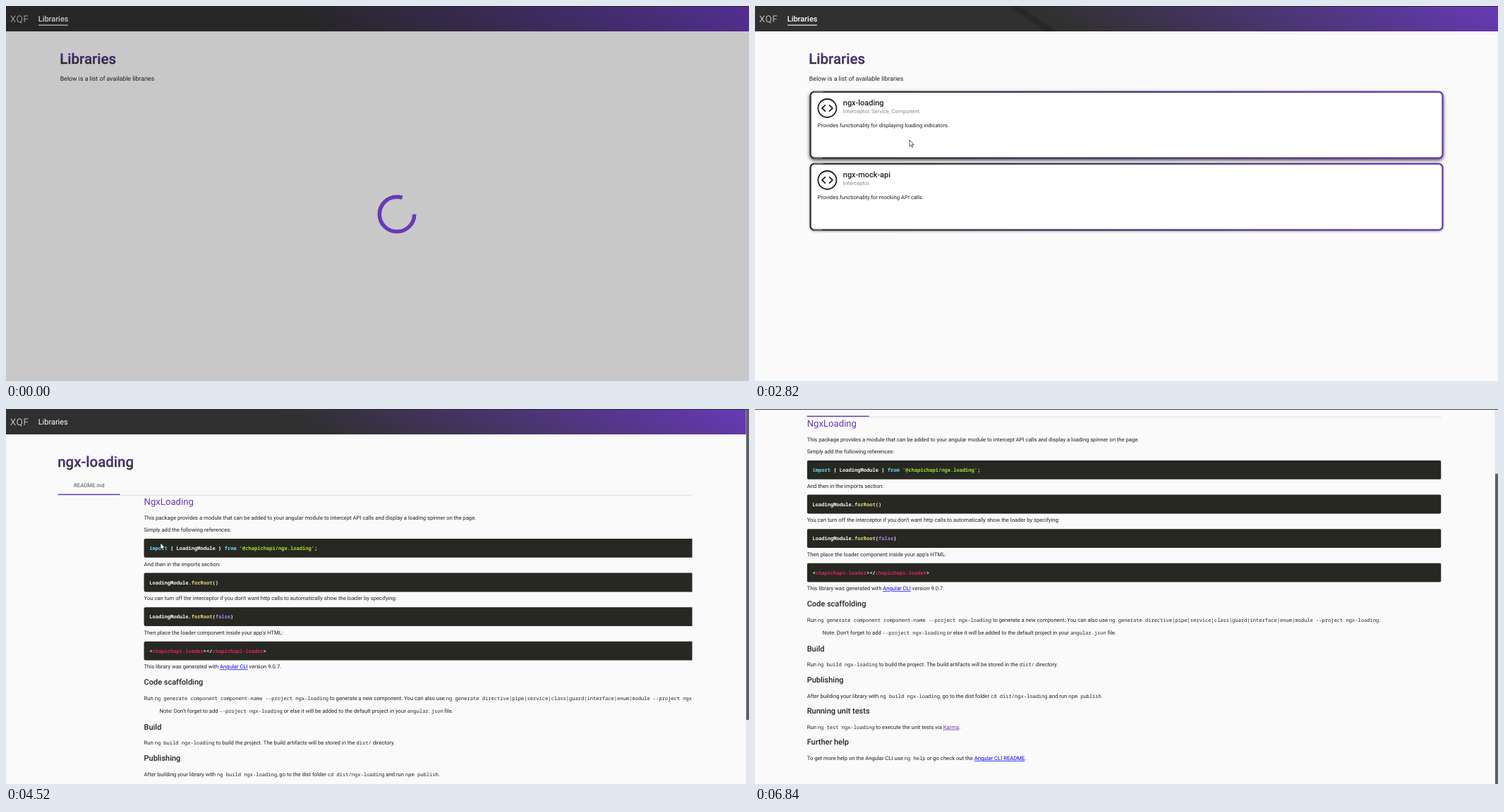
Recreate the animation shown at these times as an HTML page. Size 1053 by 532 pixels, loop 7150 ms.

```html
<!DOCTYPE html>
<html lang="en">
<head>
<meta charset="utf-8">
<title>Libraries</title>
<style>
  html, body { margin: 0; width: 100%; height: 100%; overflow: hidden; background: #fafafa; }
  svg { display: block; width: 100vw; height: 100vh; }
  text { font: 7.68px Roboto, sans-serif; fill: #212121; white-space: pre; text-rendering: geometricPrecision; }
  .brand { font-size: 13.16px; font-weight: 300; letter-spacing: .9px; fill: #fff; }
  .nav { font-size: 10.97px; fill: #fff; }
  .title { font-size: 20.5px; font-weight: 500; fill: url(#ink); stroke: url(#ink); stroke-width: .25; }
  .lead { font-size: 8.775px; }
  .head { font-size: 10.97px; font-weight: 500; }
  .top { font-size: 13.16px; fill: #673ab7; }
  .muted { fill: #8a8a8a; }
  .tab { font-weight: 500; fill: #707070; text-anchor: middle; }
  .mono { font-family: "Noto Sans Mono", monospace; font-size: 7.08px; }
  .block { fill: #f8f8f2; font-weight: 600; }
  .link { fill: #0000ee; text-decoration: underline; }
  .seen { fill: #673ab7; }
  .frame { fill: #fff; stroke: url(#edge); stroke-width: 2.2; filter: drop-shadow(0 1.8px 1.5px rgba(0, 0, 0, .4)); }
  .hover .frame { filter: drop-shadow(0 2.6px 2.4px rgba(0, 0, 0, .75)); }
  .icon { fill: none; stroke: #212121; stroke-width: 1.8; }
</style>
</head>
<body>
<svg id="stage" viewBox="0 0 1053 532" preserveAspectRatio="none">
  <defs>
    <linearGradient id="bar" gradientUnits="userSpaceOnUse" x1="385" x2="1053" y1="0" y2="0" gradientTransform="skewX(61)">
      <stop offset="0" stop-color="#303030"/><stop offset="1" stop-color="#673ab7"/>
    </linearGradient>
    <linearGradient id="edge" gradientUnits="userSpaceOnUse" x1="78" x2="975" y1="0" y2="0">
      <stop offset="0" stop-color="#303030"/><stop offset=".1" stop-color="#303030"/><stop offset="1" stop-color="#673ab7"/>
    </linearGradient>
    <linearGradient id="ink" x1="0" x2="0" y1="0" y2="1">
      <stop offset=".15" stop-color="#5a34a0"/><stop offset=".85" stop-color="#303030"/>
    </linearGradient>
    <clipPath id="tabClip"><rect x="73.7" y="0" width="898.8" height="700"/></clipPath>
    <filter id="soft"><feGaussianBlur stdDeviation="1.6"/></filter>
    <clipPath id="barClip"><rect width="1053" height="36"/></clipPath>
  </defs>
  <g id="page">
    <rect width="1053" height="36" fill="url(#bar)"/>
    <g id="stripe" clip-path="url(#barClip)">
      <path d="M358 -2L371 -2L430 38L414 38Z" opacity=".18" filter="url(#soft)"/>
    </g>
    <text class="brand" x="6" y="23">XQF</text>
    <text class="nav" id="nav" x="45.7" y="22">Libraries</text>
    <rect id="underline" x="46" y="26.6" width="42" height="1.1" fill="#fff"/>
    <g id="list">
      <text class="title" x="76.2" y="82">Libraries</text>
      <text class="lead" x="76.8" y="105.8">Below is a list of available libraries</text>
      <g id="cards"></g>
    </g>
    <g id="detail">
      <text class="title" id="name" y="82">ngx-loading</text>
      <rect id="rule" width="899" height=".8" fill="#000" opacity=".14"/>
      <g id="tabs">
        <text class="tab" x="117.8" y="110.8">README.md</text>
        <rect x="73.7" y="120.6" width="88" height="1.4" fill="#673ab7"/>
        <g clip-path="url(#tabClip)"><g id="readme"></g></g>
      </g>
    </g>
  </g>
  <g id="scrollbar">
    <rect x="1048.6" width="4.4" height="532" fill="#e6e4ef"/>
    <rect id="thumb" x="1049" width="4" height="441" fill="#606060"/>
  </g>
  <g id="loader">
    <rect width="1053" height="532" opacity=".2"/>
    <circle id="arc" cx="554" cy="295.4" r="24.7" fill="none" stroke="#673ab7" stroke-width="5.5" pathLength="360"/>
  </g>
  <path id="cursor" d="M0 0V9.2L2.1 7.3L3.5 10.4L4.9 9.8L3.5 6.7H6.3Z" fill="#fff" stroke="#111" stroke-width=".7"/>
  <rect width="1053" height=".9" fill="#2b2b2b"/>
</svg>
<script>
const LOOP = 7150;
const $ = id => document.getElementById(id);
const show = (id, on) => { $(id).style.display = on ? '' : 'none'; };
const escape = s => s.replace(/</g, '&lt;').replace(/>/g, '&gt;');
const span = (cls, s) => `<tspan class="${cls}">${s}</tspan>`;
const line = (cls, x, y, s) => `<text class="${cls}" x="${x}" y="${y}">${s}</text>`;

// Backticks mark code, [ ] a link, { } a visited link.
const rich = s => s
  .replace(/`(.+?)`/g, (_, code) => span('mono', code))
  .replace(/\[(.+?)\]/g, (_, label) => span('link', label))
  .replace(/\{(.+?)\}/g, (_, label) => span('link seen', label));
const tint = (color, s) => `<tspan fill="${color}">${escape(s)}</tspan>`;

const card = (id, y, name, kinds, about) => `<g id="${id}" transform="translate(0 ${y})">
  <rect class="frame" x="78.6" y="1.4" width="895.8" height="93.9" rx="5.5"/>
  <path d="M84 1.3H97M84 95.3H95" stroke="#fff" stroke-width="1.2" stroke-dasharray="1.5 1" opacity=".55"/>
  <g class="icon"><circle cx="102.4" cy="24.6" r="13"/>
    <path d="M99.8 20L95 24.6L99.8 29.2M105 20L109.8 24.6L105 29.2"/></g>
  ${line('head', 124.8, 20.2, name)}${line('muted', 124.8, 31.8, kinds)}${line('', 88.6, 51.8, about)}</g>`;

$('cards').innerHTML =
  card('card1', 120.4, 'ngx-loading', 'Interceptor, Service, Component', 'Provides functionality for displaying loading indicators.') +
  card('card2', 222.4, 'ngx-mock-api', 'Interceptor', 'Provides functionality for mocking API calls.');

const LEFT = 73.7;
const [CYAN, GREEN, YELLOW, VIOLET, PINK] = ['#66d9ef', '#a6e22e', '#e6db74', '#ae81ff', '#d82463'];
const blocks = [
  tint(CYAN, 'import') + ' { LoadingModule } ' + tint(CYAN, 'from') + ' ' + tint(GREEN, "'@chapichapi/ngx.loading'") + ';',
  'LoadingModule.' + tint(YELLOW, 'forRoot') + '()',
  'LoadingModule.' + tint(YELLOW, 'forRoot') + '(' + tint(VIOLET, 'false') + ')',
  '&lt;' + tint(PINK, 'chapichapi-loader') + '&gt;&lt;/' + tint(PINK, 'chapichapi-loader') + '&gt;'
];
const heads = ['Code scaffolding', 'Build', 'Publishing', 'Running unit tests', 'Further help'];
const headY = [391, 455, 499, 543, 587.2];
const paragraphs = [
  [156.6, 'This package provides a module that can be added to your angular module to intercept API calls and display a loading spinner on the page.'],
  [174.1, 'Simply add the following references:'],
  [222.7, 'And then in the imports section:'],
  [271.2, "You can turn off the interceptor if you don't want http calls to automatically show the loader by specifying:"],
  [319.8, "Then place the loader component inside your app's HTML:"],
  [368.4, 'This library was generated with [Angular CLI] version 9.0.7.'],
  [412.7, 'Run `ng generate component component-name --project ngx-loading` to generate a new component. You can also use `ng generate directive|pipe|service|class|guard|interface|enum|module --project ngx-loading`.'],
  [431.2, "Note: Don't forget to add `--project ngx-loading` or else it will be added to the default project in your `angular.json` file.", 22],
  [476.3, 'Run `ng build ngx-loading` to build the project. The build artifacts will be stored in the `dist/` directory.'],
  [520.6, 'After building your library with `ng build ngx-loading`, go to the dist folder `cd dist/ngx-loading` and run `npm publish`.'],
  [564.7, 'Run `ng test ngx-loading` to execute the unit tests via {Karma}.'],
  [608.9, 'To get more help on the Angular CLI use `ng help` or go check out the [Angular CLI README].']
];
$('readme').innerHTML = line('top', LEFT, 135.8, 'NgxLoading') +
  paragraphs.map(([y, s, indent = 0]) => line('', LEFT + indent, y, rich(s))).join('') +
  heads.map((s, i) => line('head', LEFT, headY[i], s)).join('') +
  blocks.map((s, i) => {
    const y = 184 + 48.6 * i;
    return `<rect x="${LEFT}" y="${y}" width="898.8" height="26.8" rx="2.3" fill="#272822"/>` +
      line('mono block', LEFT + 7.8, y + 16.1, s);
  }).join('');

// Start, end and number of steps of each stretch of movement; the picture rests in between.
const moves = [[70, 500, 7], [950, 1640, 10], [1800, 2270, 7], [2740, 3410, 10], [3500, 3810, 5],
  [4360, 4760, 6], [4920, 5150, 4], [5550, 5830, 5], [6150, 6840, 10]];
const path = [[950, 775, 503], [1300, 620, 410], [1640, 300, 275], [1740, 300, 275], [2270, 219, 190],
  [4850, 219, 190], [5150, 574, 249], [6080, 574, 249], [6770, 1040, 521]];
const scroll = [[5500, 0], [5550, 14], [5620, 55], [5690, 91], [5760, 107.5], [5830, 111]];

function settle(t) {
  let shown = 0;
  for (const [from, to, steps] of moves) {
    if (t < from) break;
    const step = Math.min(steps - 1, Math.floor((t - from) / (to - from) * (steps - 1) + .1));
    shown = from + (to - from) * step / (steps - 1);
  }
  return shown;
}

function track(points, t) {
  if (t <= points[0][0]) return points[0].slice(1);
  const i = points.findIndex(p => p[0] > t);
  if (i < 0) return points[points.length - 1].slice(1);
  const [a, b] = [points[i - 1], points[i]];
  const k = (t - a[0]) / (b[0] - a[0]);
  return a.slice(1).map((v, n) => v + (b[n + 1] - v) * k);
}

// cubic-bezier(.35, 0, .25, 1)
function ease(x) {
  let lo = 0, hi = 1, u = .5;
  for (let i = 0; i < 20; i++) {
    u = (lo + hi) / 2;
    const at = 1.05 * (1 - u) ** 2 * u + .75 * (1 - u) * u * u + u ** 3;
    if (at < x) lo = u; else hi = u;
  }
  return u * u * (3 - 2 * u);
}

function spin(age) {
  const turn = age * .18;
  const growing = age <= 500;
  const k = ease(Math.min(1, growing ? age / 500 : (age - 500) / 500));
  const length = 360 * (growing ? .05 + .75 * k : .8 - .75 * k);
  const start = growing ? turn - 90 : turn - 162.5 - length;
  $('arc').setAttribute('stroke-dasharray', `${length} 360`);
  $('arc').setAttribute('transform', `rotate(${start} 554 295.4)`);
}

function draw(time) {
  const t = settle(time);
  const inDetail = t > 2850, opened = t >= 4360;
  const loading = t < 500 || (inDetail && t < 3810);

  show('list', !inDetail);
  show('cards', !loading);
  show('detail', inDetail);
  show('underline', !inDetail);
  show('stripe', !inDetail && !loading);
  show('tabs', opened);
  show('scrollbar', opened);
  show('loader', loading);
  $('nav').style.fontWeight = inDetail ? 400 : 500;
  if (loading) spin(inDetail ? t - 2840 : t + 500);

  $('name').setAttribute('x', opened ? 73.2 : 76.4);
  $('rule').setAttribute('x', opened ? LEFT : 76.7);
  $('rule').setAttribute('y', opened ? 121.9 : 95.2);
  const slide = 898 * (1 - ease(Math.max(0, Math.min(1, (t - 4220) / 500))));
  $('readme').setAttribute('transform', `translate(${slide} 0)`);

  const [top] = track(scroll, t);
  $('page').setAttribute('transform', `translate(0 ${-top})`);
  $('thumb').setAttribute('y', top * 532 / 643);

  const [x, y] = track(path, t);
  const pointing = t >= 950 && t < 6840;
  show('cursor', pointing);
  $('cursor').setAttribute('transform', `translate(${x} ${y})`);
  $('card1').classList.toggle('hover', pointing && y > 120 && y < 217);
  $('card2').classList.toggle('hover', pointing && y > 222 && y < 319);
}

const began = performance.now();
function tick() {
  draw((performance.now() - began) % LOOP);
  requestAnimationFrame(tick);
}
tick();
</script>
</body>
</html>
```
